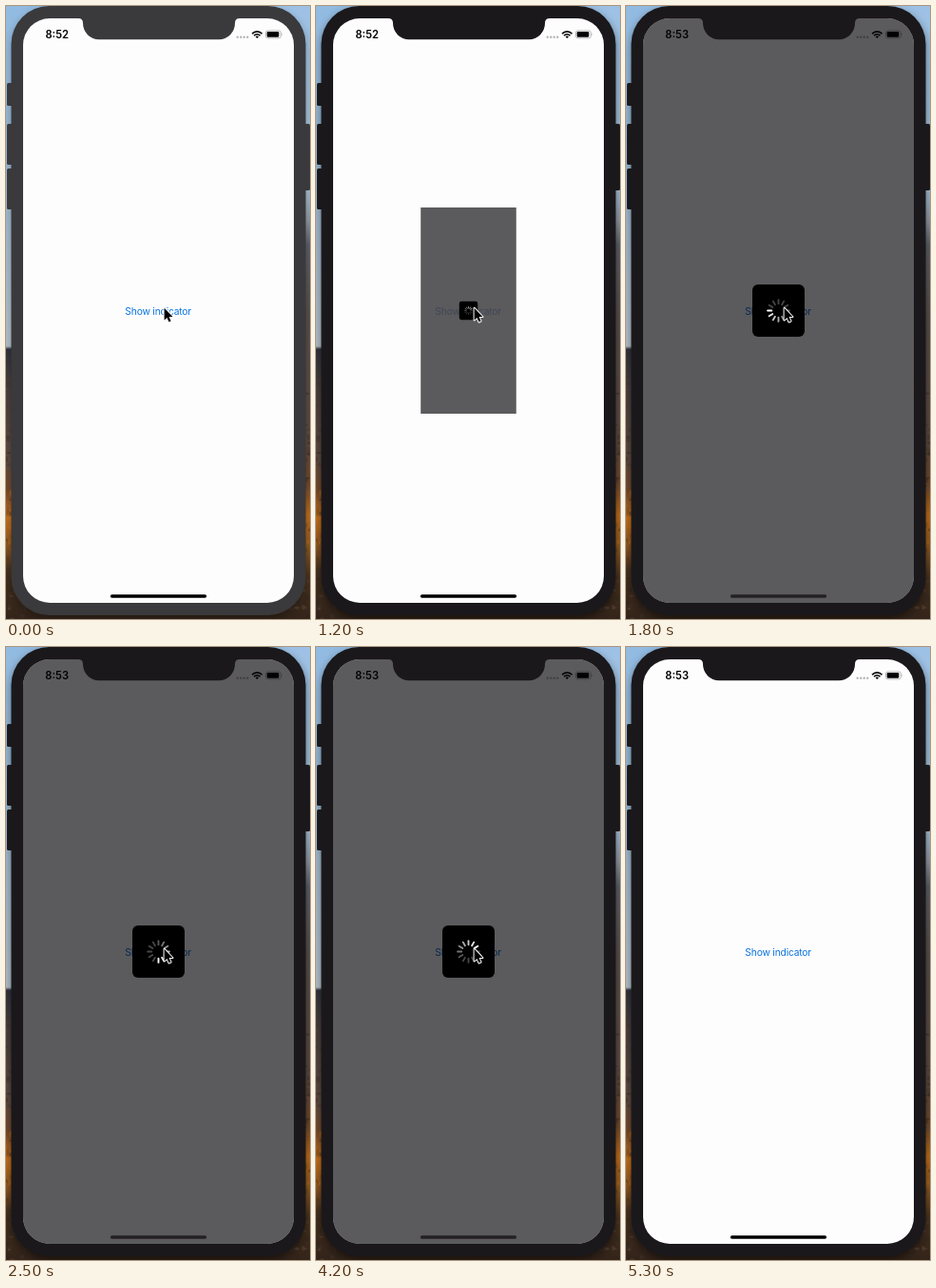
An HTML page for the animation above (5400 ms loop, 320 by 645 pixels).

```html
<!DOCTYPE html>
<html lang="en">
<head>
<meta charset="utf-8">
<title>Show indicator</title>
<style>
  html, body { margin: 0; width: 100%; height: 100%; overflow: hidden; background: #2a1d14; }
  svg { display: block; width: 320px; height: 645px; }
  text { font-family: Inter, Roboto, sans-serif; text-anchor: middle; }
  .time { font-size: 11.2px; font-weight: 600; }
  .label { font-size: 10.3px; letter-spacing: -0.2px; fill: #0b74dc; }
</style>
</head>
<body>
<svg viewBox="0 0 320 645">
  <defs>
    <linearGradient id="west" x2="0" y2="1">
      <stop offset="0" stop-color="#92bbe2"/>
      <stop offset=".25" stop-color="#98b5cf"/>
      <stop offset=".555" stop-color="#b3bfc9"/>
      <stop offset=".56" stop-color="#30333b"/>
      <stop offset=".61" stop-color="#453d3d"/>
      <stop offset=".74" stop-color="#5c4a40"/>
      <stop offset=".79" stop-color="#74492a"/>
      <stop offset=".835" stop-color="#c4701c"/>
      <stop offset=".88" stop-color="#8f5620"/>
      <stop offset=".92" stop-color="#45301f"/>
      <stop offset="1" stop-color="#33241a"/>
    </linearGradient>
    <linearGradient id="east" x2="0" y2="1">
      <stop offset="0" stop-color="#9dc1e5"/>
      <stop offset=".3" stop-color="#a9bfd2"/>
      <stop offset=".35" stop-color="#8f99a4"/>
      <stop offset=".39" stop-color="#5d6068"/>
      <stop offset=".5" stop-color="#58504d"/>
      <stop offset=".7" stop-color="#5c4a42"/>
      <stop offset=".78" stop-color="#70492c"/>
      <stop offset=".83" stop-color="#bd6c1b"/>
      <stop offset=".88" stop-color="#8f5a20"/>
      <stop offset=".93" stop-color="#49331f"/>
      <stop offset="1" stop-color="#33241a"/>
    </linearGradient>
    <filter id="blur" x="-10%" y="-10%" width="120%" height="120%"><feGaussianBlur stdDeviation="5"/></filter>
    <clipPath id="glass"><rect x="18" y="13" width="285" height="615" rx="28"/></clipPath>
  </defs>

  <rect width="160" height="645" fill="url(#west)"/>
  <rect x="160" width="160" height="645" fill="url(#east)"/>
  <g id="scrub"></g>
  <rect id="shadow" x="6" y="4" width="309.5" height="641" rx="40" filter="url(#blur)"/>

  <g id="bezel">
    <rect x="1" y="81" width="8" height="24" rx="1.5"/>
    <rect x="1" y="124" width="8" height="43" rx="1.5"/>
    <rect x="1" y="171" width="8" height="43" rx="1.5"/>
    <rect x="312" y="124" width="8" height="70" rx="1.5"/>
    <rect x="5.5" y="0" width="310" height="641" rx="40"/>
  </g>

  <g clip-path="url(#glass)">
    <rect x="18" y="13" width="285" height="615" fill="#fefdfe"/>
    <text id="clock" class="time" x="53.7" y="34">8:52</text>
    <g fill="#b5b4b7">
      <circle cx="243.7" cy="32.8" r="1.2"/>
      <circle cx="247.2" cy="32.8" r="1.2"/>
      <circle cx="250.7" cy="32.8" r="1.2"/>
      <circle cx="254.2" cy="32.8" r="1.2"/>
    </g>
    <g transform="translate(264.3 33.8)" fill="none" stroke="#000" stroke-width="1.7">
      <path d="M-5.2 -4.6A7 7 0 0 1 5.2 -4.6M-3.2 -2.6A4.3 4.3 0 0 1 3.2 -2.6"/>
      <path d="M0 .2L-1.7 -1.5A2.4 2.4 0 0 1 1.7 -1.5Z" fill="#000" stroke="none"/>
    </g>
    <rect x="273.5" y="25.9" width="15.8" height="8" rx="2.3" fill="none" stroke="#a4a3a6" stroke-width=".8"/>
    <rect x="274.7" y="27.1" width="12.6" height="5.6" rx="1.2"/>
    <path d="M290.3 28.6q1.4 1.3 0 2.6z" fill="#a4a3a6"/>
    <text id="label" class="label" x="160.2" y="324.5">Show indicator</text>
    <rect id="home" x="109.8" y="619.2" width="101.4" height="3.6" rx="1.8"/>
    <g id="overlay">
      <rect x="-142.5" y="-307.5" width="285" height="615" fill="#020004" fill-opacity=".643"/>
      <rect x="-27.5" y="-27.5" width="55" height="55" rx="6"/>
      <g id="spokes" stroke="#fff" stroke-width="1.9" stroke-linecap="round"></g>
    </g>
  </g>
  <path id="notch" d="M76 12H246V13Q241 13 241 18A17 17 0 0 1 224 35.3H98A17 17 0 0 1 81 18Q81 13 76 13Z"/>
  <path id="cursor" d="M0 0V12.8L2.9 10.2L4.9 14.8L7 13.9L5 9.4H8.9Z"
        stroke="#fff" stroke-width="2" stroke-linejoin="round" paint-order="stroke"/>
</svg>
<script>
const LOOP = 5400, TICK = 100, SPOKES = 12;
const $ = id => document.getElementById(id);
const set = (el, attrs) => { for (const k in attrs) el.setAttribute(k, attrs[k]); };
const add = (parent, tag, attrs) => {
  const el = document.createElementNS('http://www.w3.org/2000/svg', tag);
  set(el, attrs);
  return parent.appendChild(el);
};
const clamp = v => Math.min(1, Math.max(0, v));
const easeInOut = p => p < .5 ? 2 * p * p : 1 - 2 * (1 - p) ** 2;

// Seeded foliage specks along the visible edges
let seed = 11;
const rnd = () => (seed = seed * 16807 % 2147483647) / 2147483647;
const earth = ['#2b2522', '#665044', '#413632'];
const autumn = ['#c9761a', '#2e2114', '#7d4c1c', '#4b3518'];
for (let i = 0; i < 230; i++) {
  const y = 390 + rnd() * 255, west = rnd() < .5;
  const hues = y > 510 && y < 590 ? autumn : earth;
  add($('scrub'), 'ellipse', {
    cx: west ? rnd() * 22 : 298 + rnd() * 22, cy: y,
    rx: 1 + rnd() * 2, ry: .8 + rnd() * 2.2,
    fill: hues[Math.floor(rnd() * hues.length)], opacity: .35
  });
}

const spokes = Array.from({ length: SPOKES }, (_, i) =>
  add($('spokes'), 'line', { y1: -7.2, y2: -11.4, transform: `rotate(${i * 360 / SPOKES})` }));

function overlayState(t) {
  if (t < 4300) return { scale: easeInOut(clamp((t - 1095) / 250)), alpha: 1 };
  const left = clamp((4309 - t) / 100);
  return { scale: left, alpha: left * 1.4 };
}

function labelAlpha(t) {
  if (t < 1000) return 1;
  return .2 + .8 * clamp((t - 1150) / 250);
}

function draw(t) {
  const focused = t >= 800;
  const shell = focused ? '#1a181b' : '#3a393b';
  set($('bezel'), { fill: shell });
  set($('notch'), { fill: shell });
  set($('shadow'), { opacity: focused ? .5 : .3 });
  $('clock').textContent = t < 1500 ? '8:52' : '8:53';
  set($('label'), { opacity: labelAlpha(t) });

  const { scale, alpha } = overlayState(t);
  set($('overlay'), {
    transform: `translate(160.5 320.5) scale(${scale})`,
    opacity: Math.min(1, alpha),
    visibility: scale > .001 ? 'visible' : 'hidden'
  });
  set($('home'), { fill: scale > .99 ? '#5f5d60' : '#000' });

  const head = Math.floor(t * SPOKES / 1000);
  spokes.forEach((s, i) => {
    const age = ((head - i) % SPOKES + SPOKES) % SPOKES;
    set(s, { opacity: Math.max(.27, 1 - age * .11) });
  });

  const away = clamp((t - 4900) / 400) ** 2;
  set($('cursor'), {
    transform: `translate(${166.6 + 170 * away} ${317.7 - 200 * away})`,
    visibility: t < 5300 ? 'visible' : 'hidden'
  });
}

const start = performance.now();
function loop(now) {
  const t = Math.max(0, now - start) % LOOP;
  draw(Math.floor(t / TICK) * TICK);
  requestAnimationFrame(loop);
}
draw(0);
requestAnimationFrame(loop);
</script>
</body>
</html>
```
